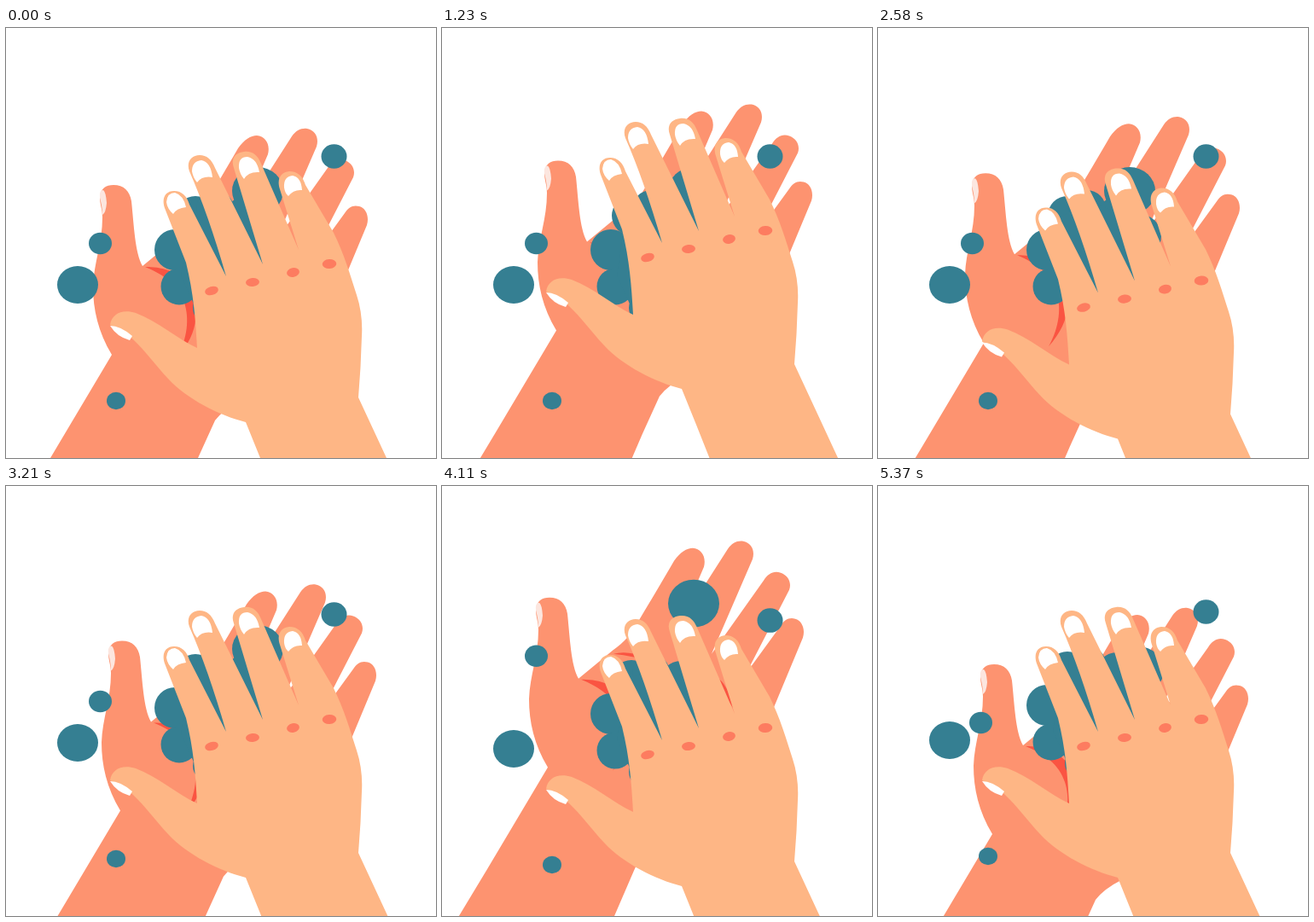
Animation of 504x504 px, one loop 5400 ms. Source, as an HTML page:

```html
<!DOCTYPE html>
<html lang="en">
<head>
<meta charset="utf-8">
<title>Hand washing</title>
<style>
  html, body { margin: 0; width: 100%; height: 100%; overflow: hidden; background: #fff; }
  svg { display: block; width: 100vw; height: 100vh; }
  .palm { fill: #fd9370; }
  .skin { fill: #feb685; }
  .crease { fill: #fa5442; }
  .knuckle { fill: #fd7c60; }
  .foam { fill: #357f92; }
  .nail { fill: #fff; }
  .pale { fill: #fce6df; }
</style>
</head>
<body>
<svg viewBox="0 0 504 504">
  <g id="back">
    <path class="palm" d="M-36 650 L52 504 L124 383 C108 356 102 330 102 303 C103 275 113 252 113 222
      C113 212 110 207 110 198 C111 188 117 184 126 184 C138 184 145 191 147 203
      C150 231 151 263 160 279 L200 246 C214 236 223 226 230 212 C245 187 258 165 272 141
      C279 131 287 126 294 126 C304 127 310 136 307 148 L278 216
      L335 127 C340 120 346 117 353 118 C363 120 367 129 364 139 L316 250
      L377 164 C382 156 389 152 397 155 C406 158 410 167 407 175 L357 272
      L397 217 C401 210 407 207 414 209 C422 211 426 221 423 231 L388 315
      C380 340 376 358 364 380 C346 414 305 418 275 437 Q255 447 245 460 L225 504 L162 650 Z"/>
    <path class="pale" d="M110 199 Q109 190 114 190 Q117 192 118 205 Q117 217 113 219 Q113 210 110 199 Z"/>
    <path class="crease" d="M163 280 C182 280 200 284 211 299 C228 324 228 356 200 387
      C213 364 215 340 209 322 C202 301 185 289 163 280 Z"/>
    <path class="crease" d="M201 250 Q212 247 226 250 L226 254 Q212 251 201 250 Z"/>
    <path class="crease" d="M322 278 Q334 283 343 316 Q334 303 322 285 Z"/>
  </g>
  <g id="foamBack" class="foam">
    <ellipse cx="295" cy="191" rx="30" ry="28"/>
    <ellipse cx="110.500" cy="252.500" rx="13.500" ry="12.700"/>
  </g>
  <g id="foamFront" class="foam">
    <ellipse cx="84" cy="301" rx="24" ry="22"/>
    <ellipse cx="384.500" cy="150.500" rx="15" ry="14.300"/>
    <ellipse cx="129" cy="437" rx="11" ry="10.200"/>
    <circle cx="198" cy="260" r="24"/>
    <circle cx="203" cy="303" r="21.500"/>
    <circle cx="222" cy="220" r="23"/>
    <circle cx="245" cy="212" r="22"/>
    <circle cx="280" cy="222" r="24"/>
    <circle cx="306" cy="244" r="26"/>
    <circle cx="238" cy="328" r="19"/>
    <path d="M215 220 L255 205 L300 225 L318 262 L300 310 L240 338 L222 328 L205 290 Z"/>
  </g>
  <g id="front">
    <path class="skin" d="M122 348 C124 335 136 329 152 334 C177 343 200 364 224 375
      C222 340 220 312 211 275 L186 211 C182 199 187 191 197 191 C206 191 212 197 215 207
      L258 291 Q237 218 215 168 C211 157 217 149 227 149 C235 149 241 154 245 164 L301 277
      L267 164 C263 153 269 146 279 145 C289 144 295 149 299 159 L343 260
      L321 189 C317 177 322 169 332 168 C342 168 348 174 351 184 L384 240
      C396 264 404 291 411 313 C416 328 418 345 417 361 Q416 398 413 433
      L446 504 L509 640 L352 640 L298 504 L281 462 C250 454 212 435 190 411
      C174 394 164 379 148 364 Z"/>
    <path class="nail" d="M122 349 Q134 349 148 361 L145 366 Q130 362 122 349 Z"/>
    <path class="nail" d="M188 204 Q189 193 198 193 Q208 196 211 210 Q200 211 196 218 Q189 212 188 204 Z"/>
    <path class="nail" d="M218 168 Q218 156 229 155 Q240 157 242 175 Q230 173 224 181 Q219 175 218 168 Z"/>
    <path class="nail" d="M273 164 Q272 151 283 151 Q294 153 297 169 Q284 168 279 177 Q274 171 273 164 Z"/>
    <path class="nail" d="M326 187 Q325 174 336 173 Q346 175 347 190 Q337 189 331 197 Q327 194 326 187 Z"/>
    <g class="knuckle">
      <ellipse cx="241" cy="308" rx="8" ry="5" transform="rotate(-15 241 308)"/>
      <ellipse cx="289" cy="298" rx="8" ry="5" transform="rotate(-6 289 298)"/>
      <ellipse cx="336.500" cy="286.500" rx="7.500" ry="5.300" transform="rotate(-12 336.500 286.500)"/>
      <ellipse cx="379" cy="276.500" rx="8.300" ry="5.500" transform="rotate(-4 379 276.500)"/>
    </g>
  </g>
</svg>
<script>
  const CYCLE = 1800, CYCLES = 3, STEP = 30;

  // Eased 0..1 between two times.
  const ease = (t, from, to) => {
    const u = Math.min(1, Math.max(0, (t - from) / (to - from)));
    return (1 - Math.cos(Math.PI * u)) / 2;
  };

  // Each hand makes two rubs per cycle, in opposite directions.
  const frontY = p =>
    -54 * ease(p, 0, 245) + 82 * ease(p, 245, 645) - 67 * ease(p, 645, 1230) + 36 * ease(p, 1230, 1410);
  const backY = p =>
    -55 * ease(p, 0, 575) + 81 * ease(p, 575, 980) - 56 * ease(p, 980, 1180) + 55 * ease(p, 1180, 1640);
  const backX = p => 10 * ease(p, 930, 1030);

  const place = (id, x, y) =>
    document.getElementById(id).setAttribute('transform', `translate(${x.toFixed(2)} ${y.toFixed(2)})`);

  function draw() {
    const t = Math.floor(performance.now() % (CYCLE * CYCLES) / STEP) * STEP;
    const p = t % CYCLE;
    const x = backX(p), y = backY(p), f = frontY(p);
    // The foam rests at first and travels with the hands in the last cycle.
    const follow = t >= CYCLE * (CYCLES - 1) ? 1 : 0;
    place('back', x, y);
    place('front', 0, f);
    place('foamBack', x * follow, y * follow);
    place('foamFront', 0, f * follow);
    requestAnimationFrame(draw);
  }
  draw();
</script>
</body>
</html>
```
